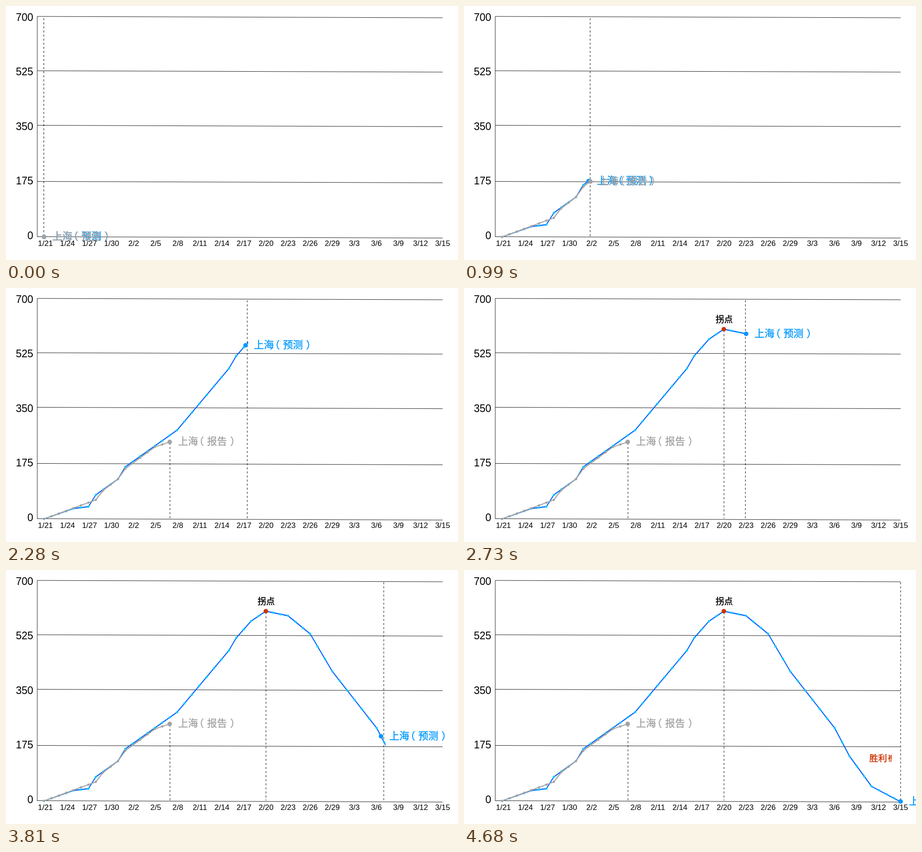
An HTML page for the animation above (5550 ms loop, 998 px wide and 561 px high).

```html
<!DOCTYPE html>
<html lang="zh-CN">
<head>
<meta charset="utf-8">
<style>
html, body { margin: 0; width: 100%; height: 100%; overflow: hidden; background: #fff; }
svg { display: block; width: 998px; height: 561px; }
.axis { font-family: "Liberation Sans", Arial, sans-serif; }
.axis line { stroke: #000; stroke-width: 0.9; }
.cjk { font-family: "Noto Sans CJK SC", "Noto Sans CJK", sans-serif; font-weight: 500; stroke-width: 0.45; }
.hand { font-family: "DejaVu Sans", sans-serif; }
.dash { stroke: #000; stroke-dasharray: 4.6 4.4; }
.forecast { color: #0099ff; }
.reported { color: #a3a3a3; }
.forecast, .reported { fill: currentColor; }
.forecast text, .reported text { stroke: currentColor; }
#win { fill: #cc3300; stroke: #cc3300; }
#peak { stroke: #000; }
</style>
</head>
<body>
<svg viewBox="0 0 998 561">
  <defs>
    <clipPath id="clipF"><rect id="maskF" height="561"/></clipPath>
    <clipPath id="clipR"><rect id="maskR" height="561"/></clipPath>
  </defs>
  <g id="grid" class="axis"></g>
  <line id="stopR" class="dash" x1="362" x2="362" y1="342" y2="509"/>
  <line id="stopPeak" class="dash" x1="574" x2="574" y1="93" y2="509"/>
  <line id="cursor" class="dash" y1="27" y2="510"/>
  <g id="lineF" clip-path="url(#clipF)"></g>
  <g id="headF" class="forecast"></g>
  <g id="lineR" clip-path="url(#clipR)"></g>
  <g id="headR" class="reported"></g>
  <circle id="peakDot" cx="573.7" cy="91" r="5" fill="#cc3300"/>
  <text id="peak" class="cjk" x="574.5" y="76" font-size="19" text-anchor="middle">拐点</text>
  <text id="win" class="cjk" x="895" y="423" font-size="19.5">胜利<tspan class="hand" x="933" font-size="20">✌&#xFE0E;</tspan></text>
</svg>
<script>
const LOOP = 5550, STEP = 30, PEAK_AT = 2490, WIN_AT = 4560;
const X0 = 84, X_END = 964, DAY = 16.32, SPEED = 0.197;

// [day, y] turning points; the days between lie on straight runs
const forecast = [[0, 510], [4, 487], [6, 483], [7, 457], [10, 422], [11, 395], [18, 314], [25, 178],
  [26, 150], [28, 113], [30, 91], [33, 101], [36, 141], [39, 224], [45, 349], [47, 411], [50, 478], [54, 512]];
const reported = [[0, 510], [7, 468], [8, 447], [10, 422], [11, 399], [15, 351], [17, 340]];

// [time, x] of the forecast head
const headPath = [[0, X0], [990, 275], [1650, 409], [2280, 529], [2850, 648], [3810, 828], [4560, X_END]];

const $ = id => document.getElementById(id);
const clamp = v => Math.min(1, Math.max(0, v));
const dayX = day => Math.min(X0 + day * DAY, X_END);
const lastDay = points => points[points.length - 1][0];

// Straight-line interpolation through [u, v] points
function lerp(points, u) {
  let i = 1;
  while (i < points.length - 1 && u > points[i][0]) i++;
  const [u0, v0] = points[i - 1], [u1, v1] = points[i];
  return v0 + (v1 - v0) * clamp((u - u0) / (u1 - u0));
}

function set(el, attrs) {
  for (const k in attrs) el.setAttribute(k, attrs[k]);
}

function add(parent, tag, attrs, text = "") {
  const el = document.createElementNS("http://www.w3.org/2000/svg", tag);
  set(el, attrs);
  el.textContent = text;
  parent.appendChild(el);
}

function buildGrid() {
  const g = $("grid");
  [23, 143, 263.5, 387.5, 509.5].forEach((y, i) => {
    add(g, "line", { x1: 69, x2: X_END, y1: y, y2: y + 3 });
    add(g, "text", { x: 60, y: 33 + i * 120.4, "font-size": 23, "text-anchor": "end" }, 700 - i * 175);
  });
  add(g, "line", { x1: 69, x2: 69, y1: 23, y2: 510 });
  for (let i = 0; i < 19; i++) {
    const d = new Date(Date.UTC(2020, 0, 21 + i * 3));
    add(g, "text", { x: 87 + i * 48.72, y: 530, "font-size": 17, "text-anchor": "middle" },
      `${d.getUTCMonth() + 1}/${d.getUTCDate()}`);
  }
}

function buildSeries(key, points, stroke, dot, label) {
  const line = $("line" + key), head = $("head" + key);
  add(line, "polyline", {
    points: points.map(([day, y]) => `${dayX(day)},${y}`).join(" "),
    fill: "none", stroke, "stroke-width": 2.3, "stroke-linejoin": "round"
  });
  for (let day = 0; day <= lastDay(points); day++)
    add(line, "circle", { cx: dayX(day), cy: lerp(points, day), r: 2.5, fill: dot });
  add(head, "circle", { r: 5 });
  add(head, "text", { class: "cjk", "font-size": 22, x: 18.5, y: 6.3, dx: "0 0 -9 7 0 7" }, label);
}

function placeHead(id, points, x) {
  set($(id), { transform: `translate(${x} ${lerp(points, (x - X0) / DAY)})` });
}

function fadeUp(id, p) {
  set($(id), { opacity: p, transform: `translate(0 ${(1 - p) * 14})` });
}

function show(id, on) {
  set($(id), { visibility: on ? "visible" : "hidden" });
}

function draw(t) {
  const cursor = Math.min(X0 - 0.5 + SPEED * t, X_END);
  const endR = dayX(lastDay(reported));
  const xR = Math.min(X0 + SPEED * t, endR);
  set($("cursor"), { x1: cursor, x2: cursor });
  set($("maskF"), { width: cursor < X_END ? cursor + t * 0.001 : 998 });
  set($("maskR"), { width: xR });
  placeHead("headF", forecast, lerp(headPath, t));
  placeHead("headR", reported, xR);
  show("stopR", xR === endR);
  show("stopPeak", t >= PEAK_AT);
  show("peakDot", t >= PEAK_AT);
  fadeUp("peak", clamp((t - PEAK_AT) / 120));
  fadeUp("win", clamp((t - WIN_AT) / 120));
}

buildGrid();
buildSeries("F", forecast, "#0066ff", "#00ccff", "上海（预测）");
buildSeries("R", reported, "#a3a3a3", "#a3a3a3", "上海（报告）");

const start = performance.now();
function frame() {
  const t = (performance.now() - start) % LOOP;
  draw(Math.floor(t / STEP) * STEP);
  requestAnimationFrame(frame);
}
draw(0);
requestAnimationFrame(frame);
</script>
</body>
</html>
```
